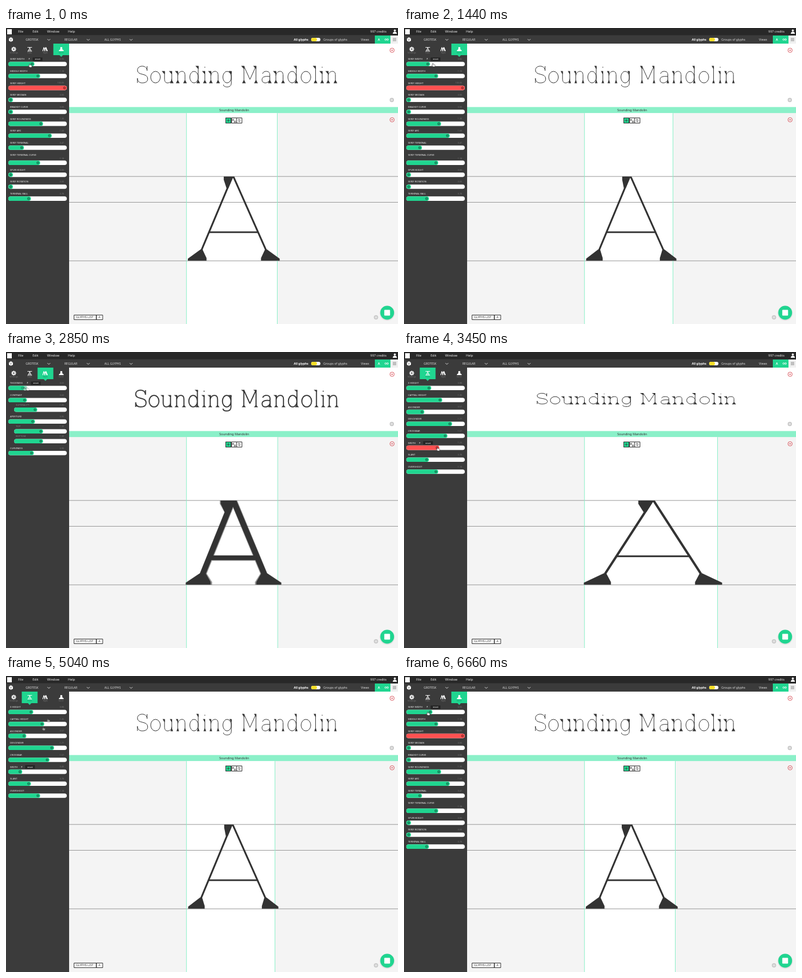
Animation, 677 px wide and 512 px high, one loop 6.69 s. Source, as an HTML page with a canvas:

```html
<!DOCTYPE html>
<html lang="en">
<head>
<meta charset="utf-8">
<title>Parametric type editor</title>
<style>
  html, body { margin: 0; width: 100%; height: 100%; overflow: hidden; background: #f4f4f4; }
  canvas { position: absolute; left: 0; top: 0; }
  canvas + canvas { opacity: .5; }
</style>
</head>
<body>
<canvas width="677" height="512" aria-label="Sounding Mandolin"></canvas>
<canvas width="677" height="512"></canvas>
<script>
const LOOP = 6690, BLEND = 25;
const GREEN = '#20d590', MINT = '#8bf0c9', DARK = '#3b3b3b', INK = '#333', RED = '#ff5151';
const SAMPLE = 'Sounding Mandolin';

const mix = (a, b, k) => a.map((v, i) => v + (b[i] - v) * k);

// apex, left leg, right leg, leg width, bar, outer foot, inner foot, flag, guide,
// title x, title width, title height, title weight, title serif, three slider knobs
const thin = [391.5, 337, 448, 3.3, 2.8, 20.8, 4.5, 13, 464, 226, 346, 1, 1, 2.2, 41, 10, 24];
const broad = [392.7, 337.7, 449, 3.3, 2.8, 22, 7, 15, 468, 226, 346, 1, 1, 3.2, 45, 10, 24];
const bare = [385, 333, 439, 3.3, 2.8, 9, 0, 4, 440, 226, 346, 1, 1, .4, 8, 10, 24];
const thick = [395, 344, 443, 22, 16.5, 28, 15, 23, 475, 219, 358, 1, 2.9, 4.4, 41, 57, 24];
const wide = [431, 347, 513, 4.8, 3, 34, 8, 24, 541, 229, 344, .64, 1, 3.6, 41, 10, 57];
const wider = [462, 351, 568, 5.2, 3, 38, 5, 27, 602, 272, 258, .44, .8, 2.6, 41, 10, 87];

// time, cursor x, cursor y, pose
const KEYS = [
  [0, 42, 65, broad], [30, 42, 65, broad], [330, 6, 65, bare], [650, 6, 65, bare],
  [1020, 38, 65, thin], [1170, 38, 65, thin], [1400, 51, 64, thin], [1480, 51, 64, thin],
  [1800, 68, 38, thin], [1920, 12, 64, thin], [2225, 63, 64, thick],
  [2275, 67, 64, mix(thin, thick, 1.04)], [2520, 68, 64, mix(thin, thick, 1.06)],
  [3080, 12, 64, thin], [3180, 41, 38, thin], [3330, 24, 168, thin],
  [3420, 59, 168, wide], [3480, 59, 168, wide], [4000, 99, 168, mix(wide, wider, 1.3)],
  [4265, 76, 169, wider], [4315, 72, 169, mix(wide, wider, .77)], [4750, 22, 168, thin],
  [5200, 95, 38, thin], [5795, 52, 65, thin], [5845, 48, 65, thin], [5930, 41, 65, thin],
  [6180, 6, 65, bare], [6450, 55, 65, mix(thin, broad, 4)], [6630, 42, 65, broad], [LOOP, 42, 65, broad]
];

// advance, skeleton, feet [x], flags [x, y]
const LETTERS = {
  S: [22, 'M17-22C16-27 13-29 9-29C4-29 1-26 1-22C1-12 18-18 18-7C18-2 14 0 9 0C4 0 1-3 1-8M17-21V-29M1-8V0', [], []],
  o: [21, 'M1-10a8 10 0 1 0 16 0a8 10 0 1 0-16 0', [], []],
  u: [22, 'M3-20V-7C3-2 5 0 8 0C11 0 15-2 15-7M15-20V0', [15], [[3, -20], [15, -20]]],
  n: [22, 'M3 0V-20M3-13C4-18 7-20 10-20C14-20 15-17 15-13V0', [3, 15], [[3, -20]]],
  d: [22, 'M15-10a7 10 0 1 0-14 0a7 10 0 1 0 14 0M15-29V0', [15], [[15, -29]]],
  i: [11, 'M4-20V0M4-28v1.6', [4], [[4, -20]]],
  g: [22, 'M15-10a7 10 0 1 0-14 0a7 10 0 1 0 14 0M15-20V0C15 5 12 7 8 7C5 7 2 6 2 3', [], [[15, -20]]],
  M: [32, 'M4 0V-29L14-6L24-29V0', [4, 24], [[4, -29], [24, -29]]],
  a: [22, 'M3-16C4-19 6-20 9-20C13-20 15-18 15-14V0M15-11C8-12 2-11 2-5.5C2-2 4 0 7.5 0C11 0 15-3 15-7', [15], []],
  l: [11, 'M4-29V0', [4], [[4, -29]]],
  ' ': [10, '', [], []]
};
const SPAN = [...SAMPLE].reduce((sum, c) => sum + LETTERS[c][0], -4);

// label, knob, slider y, sub-row
const row = (label, knob, i, shift = 0) => [label, knob, 62 + i * 20.67 + shift];
const TABS = {
  serif: p => [
    row('SERIF WIDTH', p[14], 0), row('MIDDLE WIDTH', 55, 1), row('SERIF HEIGHT', 101, 2),
    row('SERIF MEDIAN', 8, 3), row('BRACKET CURVE', 8, 4), row('SERIF ROUNDNESS', 60, 5),
    row('SERIF ARC', 75, 6), row('SERIF TERMINAL', 27, 7), row('SERIF TERMINAL CURVE', 55, 8, 5.5),
    row('SPUR HEIGHT', 8, 9, 5.5), row('SERIF ROTATION', 8, 10, 5.5), row('TERMINAL BALL', 39, 11, 5.5)],
  weight: p => [
    ['THICKNESS', p[15], 62], ['CONTRAST', 32, 83], ['SUPERALITY', 50, 99.5, 1], ['APERTURE', 46, 120],
    ['TOP', 60, 137, 1], ['BOTTOM', 60, 154, 1], ['CURVINESS', 44, 174.5]],
  shape: p => [
    row('X HEIGHT', 43, 0), row('CAPITAL HEIGHT', 62, 1), row('ASCENDER', 31, 2), row('DESCENDER', 79, 3),
    row('CROSSBAR', 71, 4), row('WIDTH', p[16], 5), row('SLANT', 39, 6), row('OVERSHOOT', 55, 7)]
};
const HINTS = { 'SERIF WIDTH': 40, THICKNESS: 37, WIDTH: 27 };

function stateAt(t) {
  t = (t + LOOP) % LOOP;
  const i = KEYS.findIndex(k => k[0] > t), a = KEYS[i - 1], b = KEYS[i];
  const k = (t - a[0]) / (b[0] - a[0]);
  const tab = t < 1800 || t >= 5200 ? 'serif' : t < 3180 ? 'weight' : 'shape';
  return { cursor: mix(a.slice(1, 3), b.slice(1, 3), k), pose: mix(a[3], b[3], k), tab };
}

function scene(g, t) {
  const { cursor, pose, tab } = stateAt(t);
  g.lineJoin = 'bevel';
  const rect = (x, y, w, h, c) => { g.fillStyle = c; g.fillRect(x, y, w, h); };
  const frame = (x, y, w, h, c) => { g.strokeStyle = c; g.lineWidth = 1; g.strokeRect(x, y, w, h); };
  const round = (x, y, w, h, r, c) => { g.fillStyle = c; g.beginPath(); g.roundRect(x, y, w, h, r); g.fill(); };
  const dot = (x, y, r, c) => { g.fillStyle = c; g.beginPath(); g.arc(x, y, r, 0, 7); g.fill(); };
  const ring = (x, y, r, c, w = 1) => { g.strokeStyle = c; g.lineWidth = w; g.beginPath(); g.arc(x, y, r, 0, 7); g.stroke(); };
  const path = (d, c, w) => {
    const p = new Path2D(d);
    if (w) { g.strokeStyle = c; g.lineWidth = w; g.stroke(p); } else { g.fillStyle = c; g.fill(p); }
  };
  const poly = (...pts) => path('M' + pts.map(p => p.join()).join('L') + 'Z', INK);
  const text = (s, x, y, size, c = '#fff', weight = 500, align = 'left') => {
    g.font = `${weight} ${size}px "Noto Sans", "Open Sans", sans-serif`;
    g.textAlign = align; g.textBaseline = 'middle'; g.fillStyle = c;
    g.fillText(s, x, y);
  };

  function title() {
    const [x0, width, sy, weight, serif] = pose.slice(9, 14);
    const sx = width / SPAN, base = 81 + 14 * sy, h = weight > 1.5 ? 2.5 : 4.5 * sy;
    let x = x0;
    for (const c of SAMPLE) {
      const [advance, d, feet, flags] = LETTERS[c], p = new Path2D();
      p.addPath(new Path2D(d), new DOMMatrix([sx, 0, 0, sy, x, base]));
      g.strokeStyle = INK; g.lineWidth = weight; g.stroke(p);
      for (const f of feet) {
        const cx = x + f * sx, s = serif + weight / 2 - .5;
        poly([cx - s, base + .5], [cx + s, base + .5], [cx + weight / 2, base - h], [cx - weight / 2, base - h]);
      }
      for (const [fx, fy] of flags) {
        const cx = x + fx * sx, y = base + fy * sy;
        poly([cx - serif * 1.5, y - .5], [cx + weight / 2, y - .5], [cx + weight / 2, y + h], [cx - weight / 2, y + h]);
      }
      x += advance * sx;
    }
  }

  function glyph() {
    const [apex, left, right, w, bar, outer, inner, flag] = pose;
    const top = 257, knee = 383, base = 402.5, r = w / 2, leftTop = apex - 1.8;
    const leg = (from, to, y) => from + (to - from) * (y - top) / (knee - top);
    for (const [from, x, dir] of [[leftTop, left, -1], [apex, right, 1]]) {
      const out = x + dir * (r + outer), inn = x - dir * (r + inner);
      poly([from - r, top], [from + r, top], [x + r, knee + 1], [x - r, knee + 1]);
      poly([x + dir * r, knee], [out, 399], [out, base], [inn, base], [inn, 398], [x - dir * r, knee]);
    }
    const barX = leg(leftTop, left, 352), notch = leg(leftTop, left, 277);
    rect(barX, 351.8, leg(apex, right, 352) - barX, bar, INK);
    poly([apex, top], [apex - r - flag, top], [apex - r - flag, 262.5], [notch - r, 277], [notch + r, 277]);
  }

  function workspace() {
    rect(109, 27, 568, 110, '#fff');
    title();
    rect(109, 136.7, 568, 10.6, MINT);
    text(SAMPLE, 394, 142, 5.6, INK, 500, 'center');
    rect(109, 147.3, 568, 365, '#f4f4f4');
    const guide = pose[8];
    rect(312, 147.3, guide - 312, 365, '#fff');
    for (const y of [256.3, 301, 402.3]) rect(109, y, 568, 1, '#999');
    rect(311.2, 147.3, 1, 365, MINT);
    rect(guide, 147.3, 1, 365, MINT);
    glyph();

    rect(379, 155, 29, 10, '#fff');
    rect(379, 155, 10, 10, GREEN);
    for (const x of [379.5, 389.5, 398.5]) frame(x, 155.5, 9, 9, INK);
    path('M381.5 160h5M384 157.5v5', INK, .8);
    path('M391 158h2v2h-2zM394 163l1.5-3l1.5 3z', INK, .8);
    path('M402 157v5l1-1l1 2M402 157l3 4', INK, .7);
    for (const y of [38.5, 158.8]) { ring(666.8, y, 3.7, '#d64a52', .9); path(`M665.3 ${y}h3`, '#d64a52', 1.3); }
    for (const [x, y] of [[666.3, 124.5], [639, 500.5]]) { dot(x, y, 3.7, '#c9c9c9'); ring(x, y, 1.3, '#fff', .8); }
    rect(117, 496, 50, 9, '#fff');
    frame(117.5, 496.5, 38.5, 8, INK);
    frame(156, 496.5, 11, 8, INK);
    text('GLYPHS LIST', 121, 500.6, 5.1, INK);
    text('A', 161.5, 500.6, 5.1, INK, 500, 'center');
    dot(658.3, 493.3, 13, 'rgba(0,0,0,.08)');
    dot(658.3, 492.5, 11.9, GREEN);
    round(653.3, 487.5, 10, 10, 1, '#fff');
  }

  function header() {
    rect(0, 0, 677, 12.6, '#282828');
    rect(2, 2, 8, 9, '#fff');
    [['File', 21], ['Edit', 46], ['Window', 71], ['Help', 107]].forEach(([s, x]) => text(s, x, 6.3, 5.6, '#eee'));
    text('997 credits', 657, 6.3, 5.4, '#eee', 500, 'right');
    dot(671.5, 4.3, 1.8, '#fff');
    path('M668 10c0-5 7-5 7 0z', '#fff');

    rect(0, 12.6, 677, 14.4, DARK);
    path('M5 18l3.5-2l3.5 2v4l-3.5 2l-3.5-2z', '#fff');
    path('M5.5 18.3l3 1.5l3-1.5M8.5 20v3.5', '#555', .6);
    [['GROTESK', 34, 74], ['REGULAR', 101, 142], ['ALL GLYPHS', 170, 216]].forEach(([s, x, v]) => {
      text(s, x, 20.2, 5, '#ddd');
      path(`M${v - 2.5} 19l2.5 2.5l2.5-2.5`, '#ddd', .9);
    });
    text('All glyphs', 497, 20.2, 5.2, '#fff', 600);
    round(527, 17, 16, 6, 3, '#fff');
    round(527, 17, 10, 6, 3, '#f6df28');
    text('Groups of glyphs', 548, 20.2, 5.2, '#ddd');
    text('Views', 613, 20.2, 5.3, '#ddd');
    rect(637, 13, 27, 14, GREEN);
    text('A', 644, 20.2, 5, '#fff', 600, 'center');
    ring(655.6, 20, 1.4, '#fff', .8);
    ring(659, 20, 1.4, '#fff', .8);
    rect(664, 13, 13, 14, '#f0f0f0');
    path('M668 18h6M668 20h6M668 22h6', '#777', .8);
  }

  function tabs() {
    const active = { shape: 1, weight: 2, serif: 3 }[tab], x = active * 27.25;
    rect(x, 27, 27.25, 20, GREEN);
    path(`M${x + 10.6} 47h6l-3 3z`, GREEN);
    dot(13.4, 36.5, 3, '#fff');
    for (let i = 0; i < 8; i++) dot(13.4 + 3.4 * Math.cos(i * Math.PI / 4), 36.5 + 3.4 * Math.sin(i * Math.PI / 4), .9, '#fff');
    dot(13.4, 36.5, 1.2, DARK);
    path('M37 33.5h8M37 40h8M38.5 40l2.5-6l2.5 6M39.3 38h3.4', '#fff', .9);
    path('M63.5 40l2-6.5l2 6.5M66.5 40l2-6.5l2 6.5M69 33.5l2.5 6.5', '#fff', 1.2);
    path('M94 33h3l.3 4l2.2 1.5v1.5h-8v-1.5l2.2-1.5z', '#fff');
    ['Settings', 'Font', 'Style', 'Serif'].forEach((s, i) =>
      text(s, 13.4 + i * 27.25, 43, 3.8, i === active ? '#159565' : '#777', 400, 'center'));
  }

  function slider([label, knob, sliderY, sub]) {
    const y = sliderY + .3, x = sub ? 14 : 4, wrap = label === 'SERIF TERMINAL CURVE';
    const ly = y - (wrap ? 13.8 : 8.3);
    const hot = knob > 100 || (label === 'WIDTH' && knob > 50);
    const end = Math.min(105, knob + 4);
    text(label, sub ? 17 : 7, ly, 4.1, sub ? '#858585' : '#eee', sub ? 400 : 500);
    text(knob > 100 ? '100.00' : ((knob - 8) / 40).toFixed(2), 100, wrap ? y - 7.5 : ly, 3.6, '#777', 400, 'right');
    round(x, y - 3.8, 105 - x, 7.6, 3.8, '#fff');
    round(x, y - 3.8, end - x, 7.6, 3.8, hot ? RED : GREEN);
    dot(knob, y, 2.3, hot ? '#9c2c2c' : '#147b55');
    dot(knob, y, .8, hot ? RED : GREEN);
    const hint = HINTS[label];
    if (hint) {
      text('?', hint, ly, 4.2, '#fff', 600, 'center');
      round(hint + 6, ly - 3, 17, 6, 1, '#252525');
      text('reset', hint + 14.5, ly, 4.1, '#fff', 500, 'center');
    }
  }

  function hand() {
    g.save();
    g.translate(...cursor);
    const d = 'M-1.5-3c1 0 1 1 1.2 2l2.3.4c1 .4.8 2 .2 3.6h-3.2l-2.2-2.6c0-.8.8-.6 1.4 0z';
    path(d, '#fff');
    path(d, '#222', .5);
    g.restore();
  }

  workspace();
  rect(0, 27, 109, 485, DARK);
  header();
  tabs();
  TABS[tab](pose).forEach(slider);
  hand();
}

// Two neighbouring moments are blended to give the soft motion trail.
const [back, front] = [...document.querySelectorAll('canvas')].map(c => c.getContext('2d'));
const start = performance.now();
function tick() {
  const t = (performance.now() - start) % LOOP;
  scene(back, t - BLEND);
  scene(front, t + BLEND);
  requestAnimationFrame(tick);
}
tick();
</script>
</body>
</html>
```
